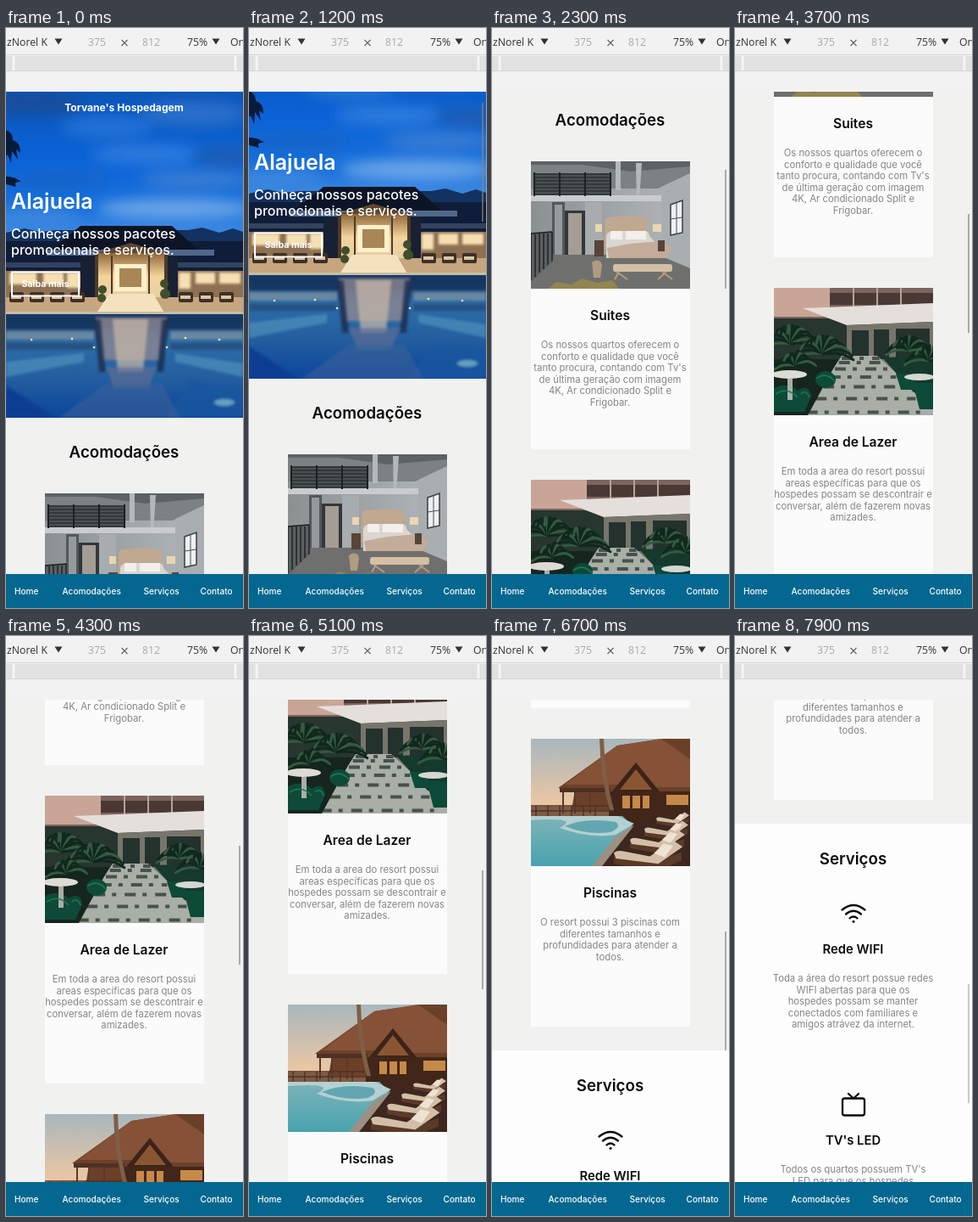
Recreate the animation shown at these times as an HTML page. Size 280x683 px, loop 8000 ms.

```html
<!DOCTYPE html>
<html lang="pt">
<head>
<meta charset="utf-8">
<title>Hospedagem</title>
<style>
html, body { margin: 0; width: 100%; height: 100%; overflow: hidden; background: #f2f2f1; }
svg { display: block; width: 280px; height: 683px; }
text { font-family: Inter, sans-serif; }
.tool { font-family: "Open Sans", sans-serif; font-size: 12.3px; fill: #333; }
.dim { fill: #a9a9a9; }
.white { fill: #fff; }
.mid { text-anchor: middle; }
.h2 { font-size: 18.7px; font-weight: 600; fill: #0a0a0a; }
.h3 { font-size: 15.6px; font-weight: 600; fill: #0a0a0a; }
.h4 { font-size: 14.8px; font-weight: 600; fill: #0a0a0a; }
.body { font-size: 11.3px; fill: #858585; }
.lead { font-size: 16.1px; font-weight: 450; fill: #fff; }
.nav { font-size: 10.1px; font-weight: 550; fill: #fff; }
</style>
</head>
<body>
<svg viewBox="0 0 280 683">
  <defs>
    <clipPath id="view"><rect y="75" width="280" height="568"/></clipPath>
    <clipPath id="pic"><rect width="188" height="150"/></clipPath>
    <clipPath id="heroBox"><rect width="280" height="384"/></clipPath>
    <filter id="soft" x="-30%" y="-60%" width="160%" height="220%"><feGaussianBlur stdDeviation="8"/></filter>
    <filter id="glow" x="-30%" y="-30%" width="160%" height="160%"><feGaussianBlur stdDeviation="1.6"/></filter>
    <linearGradient id="sky" x2="0" y2="1">
      <stop offset="0" stop-color="#0d55b8"/><stop offset=".4" stop-color="#0a62d6"/>
      <stop offset=".75" stop-color="#1c72dc"/><stop offset="1" stop-color="#5d9fe8"/>
    </linearGradient>
    <linearGradient id="water" x2="0" y2="1">
      <stop offset="0" stop-color="#173a68"/><stop offset=".3" stop-color="#2c6ca8"/>
      <stop offset=".6" stop-color="#245f9f"/><stop offset="1" stop-color="#0b459c"/>
    </linearGradient>
    <linearGradient id="lamp" x2="0" y2="1">
      <stop offset="0" stop-color="#8a6236"/><stop offset=".45" stop-color="#f3d49c"/><stop offset="1" stop-color="#e2cba6"/>
    </linearGradient>
    <linearGradient id="wall" x2="1" y2="0">
      <stop offset="0" stop-color="#8b9092"/><stop offset="1" stop-color="#b4b8ba"/>
    </linearGradient>
    <linearGradient id="dusk" x2="0" y2="1">
      <stop offset="0" stop-color="#a9b7bd"/><stop offset=".5" stop-color="#e9c6a4"/><stop offset="1" stop-color="#d9a57c"/>
    </linearGradient>
    <linearGradient id="lagoon" x2="0" y2="1">
      <stop offset="0" stop-color="#7db4b8"/><stop offset="1" stop-color="#48a3ad"/>
    </linearGradient>
  </defs>

  <g clip-path="url(#view)">
    <rect y="75" width="280" height="568" fill="#f1f1f0"/>
    <g id="page">
      <g transform="translate(0 75)" clip-path="url(#heroBox)">
        <rect width="280" height="190" fill="url(#sky)"/>
        <g filter="url(#soft)">
          <ellipse cx="30" cy="14" rx="60" ry="14" fill="#174d9c"/>
          <ellipse cx="120" cy="42" rx="54" ry="13" fill="#2272d6"/>
          <ellipse cx="222" cy="26" rx="62" ry="14" fill="#2a70cb"/>
          <ellipse cx="170" cy="74" rx="70" ry="11" fill="#2d7cdd"/>
          <ellipse cx="262" cy="76" rx="44" ry="12" fill="#1c5db4"/>
          <ellipse cx="225" cy="104" rx="66" ry="9" fill="#3c7fd2"/>
          <ellipse cx="60" cy="104" rx="60" ry="9" fill="#1863c6"/>
          <ellipse cx="200" cy="138" rx="92" ry="12" fill="#6aa6e8"/>
          <ellipse cx="30" cy="148" rx="60" ry="9" fill="#4089de"/>
        </g>
        <path d="M0 45Q8 48 8 57Q17 59 17 72L12 68 14 80 7 70 6 84 2 74 0 76ZM0 100Q9 99 18 106Q8 105 12 112L0 109Z" fill="#071b3c"/>
        <path d="M0 166L22 161 40 165 60 163H215L232 160 252 166 268 161 280 165V206H0Z" fill="#14325f"/>
        <path d="M0 176H280V220H0Z" fill="#101d38"/>
        <path d="M88 158H196L228 187H52Z" fill="#0d1426"/>
        <path d="M48 186H246V193H48Z" fill="#51688a"/>
        <path d="M0 201H88V207H0ZM202 201H280V207H202Z" fill="#32435f"/>
        <rect y="211" width="280" height="33" fill="#8e7152"/>
        <g fill="#f6dfb2" filter="url(#glow)">
          <rect x="4" y="213" width="32" height="14"/><rect x="44" y="213" width="24" height="14"/><rect x="72" y="213" width="16" height="18"/>
          <rect x="204" y="213" width="14" height="19"/><rect x="224" y="213" width="23" height="13"/><rect x="252" y="213" width="25" height="13"/>
        </g>
        <path d="M88 193H106V246H88ZM188 193H203V246H188Z" fill="#182033"/>
        <path d="M106 189H188V252H106Z" fill="url(#lamp)"/>
        <path d="M106 190L147 178 188 190Z" fill="#5f4630"/>
        <rect x="128" y="203" width="38" height="32" fill="#fff0cb"/>
        <rect x="134" y="208" width="26" height="22" fill="#a88656"/>
        <g fill="#4d3a2a"><rect x="105" y="189" width="4" height="56"/><rect x="187" y="189" width="4" height="56"/><rect x="124" y="193" width="2" height="48"/><rect x="168" y="193" width="2" height="48"/></g>
        <path d="M0 242H280V262H0Z" fill="#c6a67f"/>
        <path d="M122 238H174L188 262H106Z" fill="#f4e2bf"/>
        <g id="seats"></g>
        <g fill="#3f4f2b"><circle cx="114" cy="233" r="5"/><circle cx="187" cy="226" r="5"/><circle cx="113" cy="243" r="5"/><circle cx="188" cy="238" r="6"/></g>
        <rect y="261" width="280" height="123" fill="url(#water)"/>
        <rect y="259" width="280" height="3" fill="#c9bda8"/>
        <g filter="url(#glow)">
          <path d="M0 264H280V280H0Z" fill="#142d55" opacity=".7"/>
          <path d="M0 282H104V292H0ZM194 282H280V292H194Z" fill="#7f95a4" opacity=".75"/>
          <path d="M0 296H104V304H0ZM194 296H280V304H194Z" fill="#234674" opacity=".7"/>
          <path d="M106 266H190L182 316H114Z" fill="#8c8791" opacity=".8"/>
          <path d="M126 268H168L162 330H132Z" fill="#c9b9a8" opacity=".7"/>
          <path d="M104 268H112L118 330H110ZM184 268H192L186 330H178Z" fill="#1d2b4b" opacity=".8"/>
          <path d="M118 324H178L168 350H128Z" fill="#5f6d95" opacity=".7"/>
          <path d="M0 318L92 308V318L0 336ZM200 308L280 320V336L200 318Z" fill="#5597be" opacity=".6"/>
          <path d="M190 384L218 340 280 350V384Z" fill="#17559f" opacity=".8"/>
          <path d="M62 384L118 344H184L206 384Z" fill="#396298" opacity=".6"/>
          <ellipse cx="258" cy="366" rx="12" ry="4" fill="#87c0cf" opacity=".7"/>
          <path d="M0 346L58 384H0Z" fill="#083c92"/>
        </g>
        <g fill="#f4e6cc"><circle cx="30" cy="292" r="1.3"/><circle cx="78" cy="291" r="1.3"/><circle cx="212" cy="290" r="1.3"/><circle cx="252" cy="292" r="1.3"/><circle cx="104" cy="301" r="1.3"/><circle cx="190" cy="301" r="1.3"/></g>
      </g>
      <text class="white mid" x="139.5" y="98" font-size="12.1" font-weight="650">Torvane's Hospedagem</text>
      <text class="white" x="6" y="212.5" font-size="25" font-weight="600">Alajuela</text>
      <text class="lead" x="6" y="248">Conheça nossos pacotes</text>
      <text class="lead" x="6" y="267">promocionais e serviços.</text>
      <rect x="7" y="287.5" width="79" height="28" fill="none" stroke="#fff" stroke-width="2"/>
      <text class="white" x="18.5" y="305" font-size="10.6" font-weight="650">Saiba mais</text>
      <text class="h2 mid" x="139.5" y="506">Acomodações</text>

      <g transform="translate(46 548)">
        <rect width="188" height="339" fill="#fbfbfb"/>
        <g clip-path="url(#pic)">
          <rect width="188" height="150" fill="url(#wall)"/>
          <path d="M0 0H188V18L150 32H0Z" fill="#7c8183"/>
          <path d="M0 0H188V6L118 12 60 4H0Z" fill="#5d6264"/>
          <path d="M100 0H106V34H100ZM124 2L131 2 128 46H125Z" fill="#b4b8b9"/>
          <path d="M154 30L188 14V130L154 112Z" fill="#a9aeb1"/>
          <path d="M0 40H154V47H0Z" fill="#c9cccd"/>
          <path d="M4 14H94V40H4Z" fill="#4a5052"/>
          <g id="rails" stroke="#1d2022" stroke-width="1"></g>
          <path d="M165 51L179 46V84L165 87Z" fill="#eef1f1" stroke="#3a3e40" stroke-width="1.5"/>
          <path d="M172 48V86M165 68L179 66" stroke="#4b4f51"/>
          <path d="M64 48H84V112H64Z" fill="#a8acae"/>
          <path d="M25 48H40V120H25Z" fill="#54585a"/><path d="M28 51H37V112H28Z" fill="#959a9c"/>
          <path d="M40 58H64V114H40Z" fill="#33373a"/><path d="M44 61H60V112H44Z" fill="#a39d93"/>
          <path d="M0 120L26 110H150L188 126V150H0Z" fill="#6f6f6d"/>
          <path d="M20 150L30 142 48 145 60 138 78 143 96 140 104 150Z" fill="#938551"/>
          <path d="M0 84H25V118L0 142Z" fill="#5b6062"/>
          <path d="M0 85L25 83M0 85V140M5 85V136M10 85V131M15 85V127M20 85V122M25 83V118" stroke="#1c2022" stroke-width="1.4" fill="none"/>
          <path d="M87 72Q86 66 93 66Q113 63 133 66Q139 66 138 72V104H87Z" fill="#c0a891"/>
          <path d="M89 90Q88 82 100 82H134Q140 82 140 88L150 98V114H89Z" fill="#dbd6d0"/>
          <path d="M94 82H108V92H94ZM112 82H136V92H112Z" fill="#f3efea"/>
          <path d="M118 97L152 94 166 101 160 114 92 114 90 102Z" fill="#c3ac98"/>
          <rect x="97" y="121" width="70" height="9" rx="3" fill="#d3bfa5"/>
          <path d="M104 130L99 139M101 130L114 139M160 130L150 139M155 130L167 139" stroke="#b39c7d" stroke-width="2"/>
          <path d="M76 74H84V83H76ZM144 74H154V83H144Z" fill="#ecd6b0"/>
          <path d="M75 93H86V112H75ZM150 93H158V106H150Z" fill="#574538"/>
          <path d="M72 119Q81 113 84 122L82 137H74Z" fill="#b29b7f"/>
        </g>
      </g>

      <g transform="translate(46 923)">
        <rect width="188" height="339" fill="#fbfbfb"/>
        <g clip-path="url(#pic)">
          <rect width="188" height="150" fill="#27362e"/>
          <path d="M0 0H188V36H0Z" fill="#7d645e"/>
          <path d="M0 0H66V34H0Z" fill="#c9a598"/>
          <path d="M66 6H188V20H66Z" fill="#4a3835"/>
          <path d="M94 0V24M122 0V24M150 0V24" stroke="#b8a398" stroke-width="2"/>
          <path d="M34 24L188 18V40L86 44Z" fill="#e4dfdb"/>
          <path d="M86 44L188 40V100H86Z" fill="#77756c"/>
          <path d="M92 50H112V80H92ZM118 49H136V84H118ZM144 48H184V92H144Z" fill="#24322d"/>
          <path d="M80 80H122L188 140V150H34Z" fill="#a9aea7"/>
          <path id="tiles" stroke="#46524b" fill="none"/>
          <path d="M0 84L50 84 76 84 40 150H0Z" fill="#16251d"/>
          <path d="M128 82L188 80V138L164 122Z" fill="#15392c"/>
          <g id="palms" fill="none" stroke-linecap="round"></g>
          <g fill="#0d4a37"><path d="M0 118Q17 110 28 121Q42 112 44 128L36 146H0Z"/><ellipse cx="61" cy="108" rx="12" ry="10"/><path d="M144 101H166V120H150ZM164 112H188V143H172Z"/></g>
          <ellipse cx="18" cy="102" rx="21" ry="5" fill="#dcdcd5"/>
          <path d="M16 107H22V132H16Z" fill="#a9aea6"/>
          <ellipse cx="172" cy="105" rx="18" ry="4" fill="#d4d8d0"/>
          <path d="M2 125Q16 116 28 129M32 125Q38 119 42 129M50 107Q62 98 72 110" stroke="#1f7653" stroke-width="1.5" fill="none"/>
        </g>
      </g>

      <g transform="translate(46 1298)">
        <rect width="188" height="339" fill="#fbfbfb"/>
        <g clip-path="url(#pic)">
          <rect width="188" height="150" fill="url(#dusk)"/>
          <path d="M0 80H100V92H0Z" fill="#7d5b45"/>
          <path d="M32 58L102 8 156 0H188V84H48L52 60Z" fill="#6b4029"/>
          <path d="M102 8L154 0 188 24V57H140L124 30 104 54H40Z" fill="#855237"/>
          <path d="M124 28L152 62H96Z" fill="#3d2318"/>
          <path d="M124 36L143 60H105Z" fill="#8a5632"/>
          <path d="M92 62H188V104H92Z" fill="#412619"/>
          <g fill="#c58a49"><path d="M108 67H117V82H108ZM120 67H129V82H120ZM132 67H140V82H132ZM160 66H186V78H160Z"/></g>
          <path d="M34 58H94V63H34Z" fill="#4e3024"/>
          <path d="M38 63V88M52 63V88M70 63V88" stroke="#5d3827" stroke-width="2"/>
          <path d="M0 79H98M0 85H98M6 79V92M20 79V92M34 79V92M48 79V92M62 79V92M76 79V92" stroke="#4d3224" stroke-width="1.4"/>
          <path d="M81 0H86Q87 44 98 84H93Q82 44 81 0Z" fill="#7d5f48"/>
          <path d="M0 91H108L122 104 84 150H0Z" fill="url(#lagoon)"/>
          <path d="M0 91H102L122 100 100 113Q70 118 34 105Q60 92 0 96Z" fill="#b5d0d2"/>
          <path d="M40 103Q64 92 100 98Q108 104 94 110Q68 114 40 103Z" fill="#62a7b0"/>
          <path d="M122 100L188 90V150H78Z" fill="#3d271e"/>
          <path d="M100 115L122 102 84 150H72Z" fill="#9c8f83"/>
          <g id="beds"></g>
        </g>
      </g>

      <rect y="1665" width="280" height="600" fill="#fdfdfd"/>
      <text class="h2 mid" x="139.5" y="1713">Serviços</text>
      <g fill="none" stroke="#0a0a0a" stroke-width="2.3" stroke-linecap="round" stroke-linejoin="round">
        <path d="M126.5 1766.5Q140 1755.5 153.5 1766.5M131 1771.5Q140 1764 149 1771.5M135.5 1776.3Q140 1772.8 144.5 1776.3"/>
        <path d="M134 1983L140 1988.5 146 1983"/>
        <rect x="127" y="1988.5" width="26" height="20" rx="2.5"/>
      </g>
      <circle cx="140" cy="1780.2" r="1.5"/>
    </g>
    <rect id="bar" x="275" width="2" height="140" fill="#858585"/>
  </g>

  <rect width="280" height="75" fill="#f2f2f2"/>
  <rect y="31" width="280" height="1" fill="#d2d2d2"/>
  <rect y="33" width="280" height="17" fill="#e1e1e1"/>
  <path d="M9 33V50M271 33V50" stroke="#f6f6f6" stroke-width="3"/>
  <rect y="50" width="280" height="1" fill="#d6d6d6"/>
  <g class="tool">
    <text class="tool" x="1" y="21">zNorel K</text>
    <text class="tool dim" x="97" y="21">375</text>
    <path d="M136.5 14L143.5 21M143.5 14L136.5 21" stroke="#666" stroke-width="1.2"/>
    <text class="tool dim" x="161" y="21">812</text>
    <text class="tool" x="214" y="21">75%</text>
    <text class="tool" x="265" y="21">Online</text>
    <path d="M57.5 12.5H66.5L62 19.5ZM243.5 12.5H252.5L248 19.5Z"/>
  </g>
  <rect y="643" width="280" height="40" fill="#04678f"/>
  <text class="nav" x="10" y="667">Home</text>
  <text class="nav" x="66.5" y="667">Acomodações</text>
  <text class="nav" x="162.5" y="667">Serviços</text>
  <text class="nav" x="229.5" y="667">Contato</text>
</svg>
<script>
const $ = id => document.getElementById(id);
const page = $('page'), bar = $('bar');

function add(parent, tag, attrs, text) {
  const el = document.createElementNS('http://www.w3.org/2000/svg', tag);
  for (const k in attrs) el.setAttribute(k, attrs[k]);
  if (text) el.textContent = text;
  parent.appendChild(el);
}

function block(cls, y, title, lines) {
  add(page, 'text', { class: cls + ' mid', x: 139.5, y }, title);
  lines.split('|').forEach((line, i) =>
    add(page, 'text', { class: 'body mid', x: 139.5, y: y + 33 + i * 13.5 }, line));
}

block('h3', 735, 'Suites', "Os nossos quartos oferecem o|conforto e qualidade que você|tanto procura, contando com Tv's|de última geração com imagem|4K, Ar condicionado Split e|Frigobar.");
block('h3', 1110, 'Area de Lazer', 'Em toda a area do resort possui|areas específicas para que os|hospedes possam se descontrair e|conversar, além de fazerem novas|amizades.');
block('h3', 1485, 'Piscinas', 'O resort possui 3 piscinas com|diferentes tamanhos e|profundidades para atender a|todos.');
block('h4', 1818, 'Rede WIFI', 'Toda a área do resort possue redes|WIFI abertas para que os|hospedes possam se manter|conectados com familiares e|amigos atrávez da internet.');
block('h4', 2043, "TV's LED", "Todos os quartos possuem TV's|LED para que os hospedes");

// Photo details
for (const x of [4, 28, 52, 76, 204, 228, 252]) {
  add($('seats'), 'rect', { x, y: 236, width: 17, height: 12, rx: 2, fill: '#3f3026' });
  add($('seats'), 'rect', { x: x + 2, y: 240, width: 12, height: 4, fill: '#dcc8a4' });
}
for (let y = 15; y <= 39; y += 4) add($('rails'), 'path', { d: `M4 ${y}H94` });
for (const x of [4, 34, 64, 94]) add($('rails'), 'path', { d: `M${x} 13V41`, 'stroke-width': 2 });

let grid = '';
for (let i = 0; i < 7; i++) {
  const y = 83 + i * i * 1.1 + i * 4;
  grid += `M${82 - (y - 80) * .65} ${y}H${122 + (y - 80) * .9}`;
}
$('tiles').setAttribute('d', grid);
$('tiles').setAttribute('stroke-width', 4);
$('tiles').setAttribute('stroke-dasharray', '13 8 5 10');

function palm(x, y, r, n) {
  for (let i = 0; i < n; i++) {
    const a = Math.PI * (1 + (i + .5) / n), dx = Math.cos(a) * r, dy = Math.sin(a) * r;
    add($('palms'), 'path', {
      d: `M${x} ${y}Q${x + dx * .6} ${y + dy} ${x + dx} ${y + dy * .6 + r * .25}`,
      stroke: i % 3 ? '#10281d' : '#345a42', 'stroke-width': 3
    });
  }
}
palm(20, 66, 36, 14);
palm(58, 78, 36, 15);
palm(26, 92, 26, 11);
palm(160, 74, 28, 13);
palm(184, 86, 30, 11);

[[148, 92, .6], [134, 104, .8], [117, 116, 1], [98, 131, 1.25]].forEach(([x, y, k]) => {
  const g = { transform: `translate(${x} ${y}) scale(${k})` };
  add($('beds'), 'path', { ...g, d: 'M0 5L38 11 64 2V10L40 20 0 13Z', fill: '#5a3a28' });
  add($('beds'), 'path', { ...g, d: 'M0 3Q2 0 8 1L34 6 56 -9 65 -3 42 13 2 8Z', fill: '#d3bfa8' });
  add($('beds'), 'path', { ...g, d: 'M38 3L47 -6 56 -4 48 7Z', fill: '#efe2d2' });
});

// Scroll keys: time, offset
const keys = [
  [0, 0], [1100, 0], [1200, 46], [2300, 391], [2500, 415], [3100, 415], [3700, 617],
  [4300, 735], [4500, 735], [5100, 864], [5400, 1005], [5900, 1089], [6100, 1089],
  [6700, 1177], [7500, 1444], [8000, 1444]
];
const slope = i => (keys[i + 1][1] - keys[i][1]) / (keys[i + 1][0] - keys[i][0]);
const tangent = keys.map((_, i) => {
  if (!i || i === keys.length - 1) return 0;
  const a = slope(i - 1), b = slope(i);
  return a * b > 0 ? 2 * a * b / (a + b) : 0;
});

// Monotone cubic interpolation
function scrollAt(t) {
  let i = 0;
  while (i < keys.length - 2 && t >= keys[i + 1][0]) i++;
  const [t0, a] = keys[i], [t1, b] = keys[i + 1];
  const h = t1 - t0, u = (t - t0) / h, v = 1 - u;
  return v * v * (1 + 2 * u) * a + u * u * (3 - 2 * u) * b
    + h * u * v * (v * tangent[i] - u * tangent[i + 1]);
}

function barAlpha(t) {
  if (t < 1200 || (t >= 3000 && t < 3200)) return 0;
  const since = t >= 7800 ? t - 7800 : t >= 2700 && t < 3000 ? t - 2700 : 0;
  return .65 * (1 - since / 300);
}

function draw(ms) {
  const t = Math.floor(ms % 8000 / 100) * 100;
  const s = Math.round(scrollAt(t));
  page.setAttribute('transform', `translate(0 ${-s})`);
  bar.setAttribute('y', Math.round(77.3 + s * .2304));
  bar.setAttribute('opacity', barAlpha(t));
}

const start = performance.now();
function tick() {
  draw(performance.now() - start);
  requestAnimationFrame(tick);
}
tick();
</script>
</body>
</html>
```
